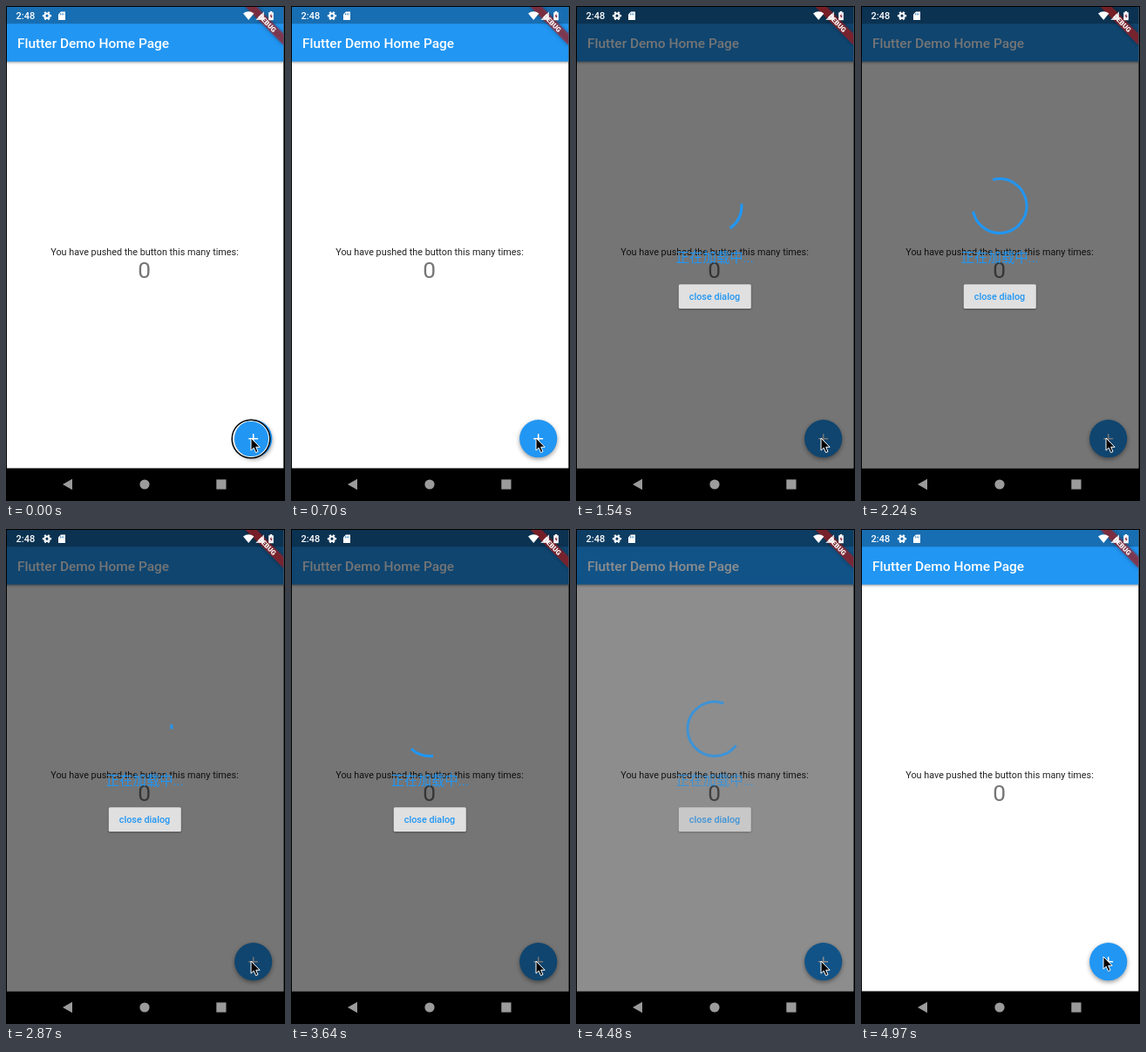
An HTML page for the animation above (5040 ms loop, 320 px wide and 566 px high).

```html
<!DOCTYPE html>
<html lang="en">
<head>
<meta charset="utf-8">
<style>
  html, body { margin: 0; width: 100%; height: 100%; overflow: hidden; background: #000; }
  svg { display: block; width: 100vw; height: 100vh; }
  text { font-family: Roboto, sans-serif; }
  .mid { text-anchor: middle; }
  .bold { font-weight: 500; }
  .label { font: 15.4px Roboto, "Noto Sans CJK SC", "Noto Sans CJK", sans-serif; }
  .bar { filter: drop-shadow(0 1.5px 1.5px #0006); }
  .fab { filter: drop-shadow(0 2.5px 2.5px #0006); }
  .raised { filter: drop-shadow(0 1px 1px #0005); }
  .banner { filter: drop-shadow(0 0 2.5px #0008); }
</style>
</head>
<body>
<svg viewBox="0 0 320 566">
  <defs>
    <clipPath id="screen"><rect x="1" y="1" width="317.3" height="527.5"/></clipPath>
    <clipPath id="fabEdge"><circle cx="283.7" cy="494.7" r="21.6"/></clipPath>
  </defs>

  <g clip-path="url(#screen)">
    <rect width="320" height="566" fill="#fff"/>
    <g class="bar"><rect x="-9" y="-9" width="340" height="72.5" fill="#2196f3"/></g>
    <rect width="320" height="20.3" fill="#0004"/>
    <text class="bold" x="13" y="47.6" font-size="15.47" fill="#fff">Flutter Demo Home Page</text>
    <text class="mid" x="159" y="284.6" font-size="10.83" fill="#000d">You have pushed the button this many times:</text>
    <text class="mid" x="158.7" y="311.4" font-size="26.3" fill="#0000008a">0</text>
    <g class="fab"><circle cx="283.7" cy="494.7" r="21.6" fill="#2196f3"/></g>
    <circle id="ripple" cx="281" cy="494.5" fill="#c8c8c8" clip-path="url(#fabEdge)"/>
    <path d="M278.3 494.7h10.8M283.7 489.3v10.8" stroke="#fff" stroke-width="1.55"/>

    <rect id="scrim" width="320" height="566"/>
    <g id="dialog">
      <g id="loader" fill="#2196f3">
        <circle id="arc" cx="159" cy="228.6" r="31" pathLength="360" fill="none"
                stroke="#2196f3" stroke-width="3.1" stroke-linecap="square"/>
        <text class="mid label" lang="zh-CN" x="159.3" y="292.6">正在加载中...</text>
      </g>
      <g class="raised"><rect x="117.8" y="318.3" width="83" height="27.8" rx="1.5" fill="#e0e0e0"/></g>
      <text class="mid bold" x="159" y="336" font-size="10.83" fill="#2196f3">close dialog</text>
    </g>

    <g transform="translate(318.3 1) rotate(45)">
      <g class="banner"><rect x="-31" y="21.6" width="62" height="9.3" fill="#b71c1c" fill-opacity=".63"/></g>
      <text class="mid" y="29.1" font-size="7.9" font-weight="900" fill="#fff">DEBUG</text>
    </g>
  </g>

  <g fill="#fff">
    <text class="bold" x="11.5" y="15.2" font-size="11">2:48</text>
    <circle cx="47" cy="11.2" r="2.7" fill="none" stroke="#fff" stroke-width="2.2"/>
    <circle cx="47" cy="11.2" r="4.4" fill="none" stroke="#fff" stroke-width="1.5"
            pathLength="12" stroke-dasharray="1" stroke-dashoffset=".5"/>
    <path d="M63 6.5h5v9.5h-8v-6.5z"/>
    <path d="M62.5 8.3v2M64.3 8.3v2M66.1 8.3v2" stroke="#1971b6" stroke-width=".8"/>
    <path d="M272 8.5q6.2 -4.4 12.4 0l-6.2 7.5z"/>
    <path d="M296 6.2v9.8h-9.8z" opacity=".8"/>
    <path d="M301.2 7.2h1.6v-1.2h2.4v1.2h1.6v9h-5.6z"/>
  </g>
  <path d="M304.4 8.6l-1.8 3.5h1.2v2.6l1.8-3.6h-1.2z" fill="#8a2440"/>

  <g fill="#9b9b9b">
    <path d="M65 547l11-6.2v12.4z"/>
    <circle cx="159" cy="547" r="5.6"/>
    <rect x="241.3" y="541.4" width="11.2" height="11.2"/>
  </g>

  <g id="ring" fill="none">
    <circle cx="281" cy="495" r="20.6" stroke="#fff" stroke-width="1.2"/>
    <circle cx="281" cy="495" r="21.8" stroke="#000" stroke-width="1.5"/>
  </g>
  <path id="cursor" d="M0 0v14.2l3.2-3 2.3 5.4 2.5-1.1-2.3-5.2h4.4z" stroke="#fff" stroke-width="1"/>
</svg>

<script>
const LOOP = 5040, STEP = 70;
const OPEN = 700, CLOSE = 4395, FADE = 180;
const SPIN_START = 749, SPIN_PERIOD = 1041;

const el = id => document.getElementById(id);
const set = (id, attrs) => {
  for (const name in attrs) el(id).setAttribute(name, attrs[name]);
};
const progress = (t, from, to) => Math.min(1, Math.max(0, (t - from) / (to - from)));

function bezier(x1, y1, x2, y2) {
  const at = (a, b, s) => 3 * (1 - s) ** 2 * s * a + 3 * (1 - s) * s * s * b + s ** 3;
  return x => {
    let lo = 0, hi = 1;
    for (let i = 0; i < 24; i++) {
      const mid = (lo + hi) / 2;
      if (at(x1, x2, mid) < x) lo = mid; else hi = mid;
    }
    return at(y1, y2, hi);
  };
}
const ease = bezier(.25, .1, .25, 1);
const easeOut = bezier(0, 0, .58, 1);
const fastOutSlowIn = bezier(.4, 0, .2, 1);

function drawSpinner(t) {
  const phase = Math.max(0, (t - SPIN_START) / SPIN_PERIOD);
  const turn = Math.floor(phase), p = phase - turn;
  const head = fastOutSlowIn(progress(p, 0, .5));
  const tail = fastOutSlowIn(progress(p, .5, 1));
  const start = -90 + 270 * tail + 306 * p - 144 * turn;
  set('arc', {
    'stroke-dasharray': `${Math.max(.1, 270 * (head - tail))} 360`,
    transform: `rotate(${start} 159 228.6)`
  });
}

function draw(t) {
  const shown = progress(t, OPEN, OPEN + FADE) - progress(t, CLOSE, CLOSE + FADE);
  set('scrim', { opacity: .54 * ease(shown) });
  set('dialog', { opacity: easeOut(shown) });
  set('loader', { opacity: progress(t, 820, 900) });
  drawSpinner(t);

  const press = progress(t, 400, 680);
  set('ripple', { r: 26 * press, opacity: .3 * press * (1 - press) * 2 });
  set('ring', { opacity: 1 - progress(t, 0, 280) });

  const away = progress(t, 4760, 4970);
  set('cursor', { transform: `translate(${281 - 3 * away} ${494 - 5 * away})` });
}

function frame(now) {
  draw(Math.floor(now % LOOP / STEP) * STEP);
  requestAnimationFrame(frame);
}
draw(0);
requestAnimationFrame(frame);
</script>
</body>
</html>
```
